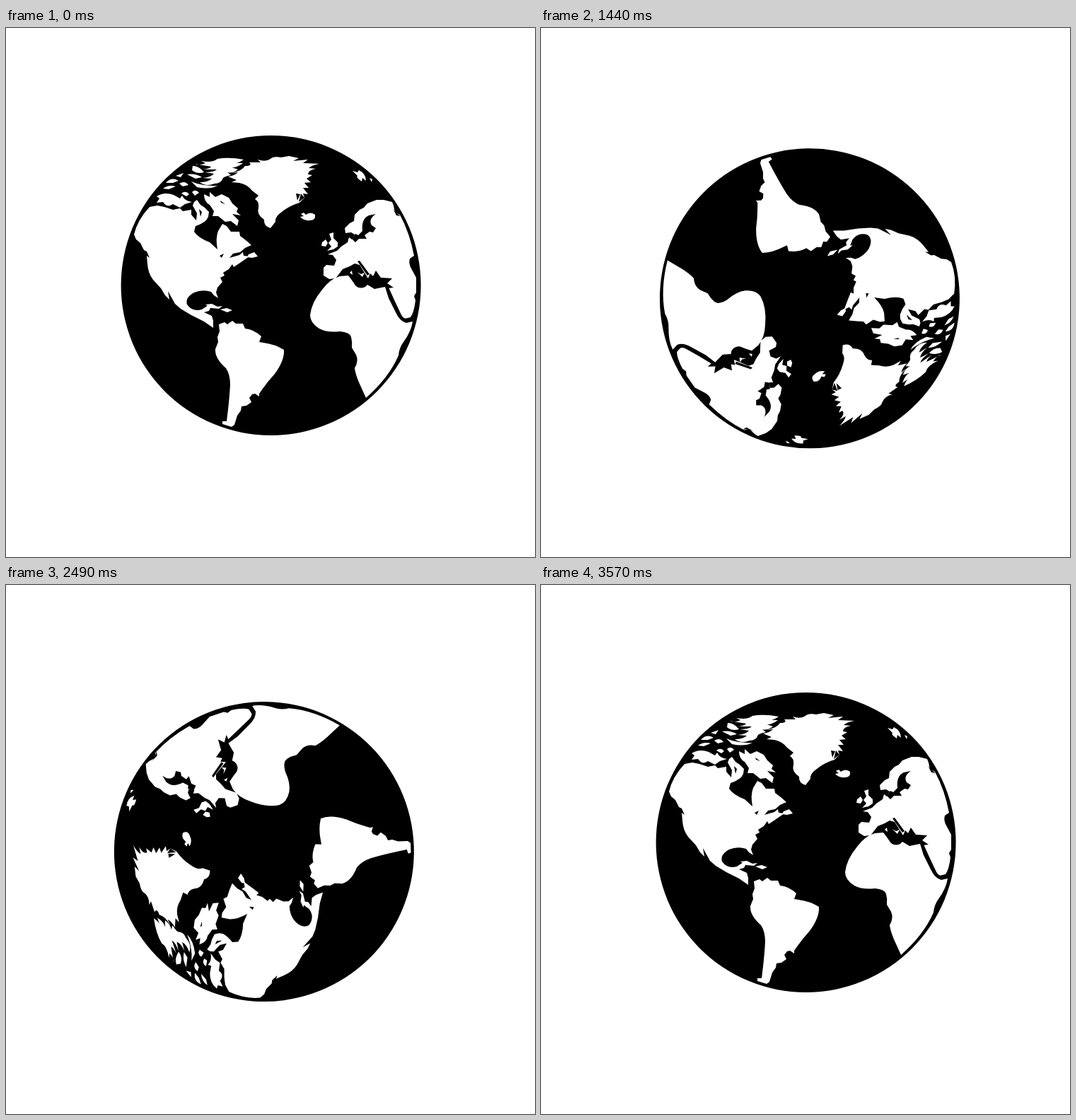
An HTML page with a canvas that plays this animation: 748x748 px, repeating every 3.6 s.

```html
<!DOCTYPE html>
<html lang="en">
<head>
<meta charset="utf-8">
<title>Spinning globe</title>
<style>
  html, body { margin: 0; width: 100%; height: 100%; overflow: hidden; background: #fff; }
  canvas { display: block; }
</style>
</head>
<body>
<canvas id="stage" width="748" height="748"></canvas>
<script>
const ctx = document.getElementById('stage').getContext('2d');

const PIVOT = { x: 374.4, y: 374 };
const GLOBE = { x: 374.6, y: 364, r: 212 };
const STEP_MS = 30;
const STEPS = 120;

const land = {
  northAmerica: `M181 292 Q186 271 203 253 L214 251 L224 253 L236 257 L246 255 L250 259 L262 257
    L262 264 L269 272 L270 262 L264 251 L266 246 L270 243 L275 250 L281 254 L287 260 L286 267 L283 272
    Q277 277 268 280 L266 288 Q272 297 288 303 L299 313 Q296 297 300 287 L306 277 L312 280 L318 288
    L330 288 L331 294 L339 300 L347 307 L338 311 L331 317 L321 319 L316 325 L330 321 L335 317 L336 322
    L344 323 L331 332 L322 338 L320 334 L315 341 L307 346 L309 350 L303 353 L306 359 L299 367 L297 374
    L300 382 L294 378 L290 373 Q278 369 266 374 Q253 381 256 391 Q264 402 277 398 L286 392 L291 392
    L287 400 L280 402 L291 407 L293 414 L293 424 L280 415 L262 406 L247 397 L239 390 L229 372
    L231 384 L225 378 L219 368 L208 356 Q201 347 200 334 L199 322 L203 325 L199 316 L195 314
    L190 304 L184 299 Z`,
  southAmerica: `M301 419 L309 416 L313 419 L320 414 L325 418 L335 418 L338 425 Q350 426 361 436 L358 444
    L364 445 Q380 447 393 455 Q394 470 380 489 Q370 500 363 510 L358 517 L358 521 L352 517 L348 518
    L344 523 L347 529 L340 534 L333 535 L332 541 L327 548 L323 561 L319 564 L306 560 L306 556 L312 556
    Q316 525 317 504 Q317 490 311 481 Q295 467 296 454 L300 444 L299 437 L302 429 Z`,
  greenland: `M314 210 Q323 209 328 204 L319 205 Q334 202 338 195 Q349 195 344 190 L360 190 L356 186
    Q367 190 374 185 Q378 181 389 183 L400 181 L414 184 L406 188 L427 186 L420 191 L443 192
    Q432 194 428 198 L438 199 Q427 201 427 207 L433 208 L425 213 L431 218 L422 219 L428 226
    L420 226 L427 235 L420 234 L422 240 L415 247 Q401 251 390 260 Q380 267 381 274 L374 283
    Q364 280 365 271 Q354 264 357 254 Q358 245 352 242 L357 237 L348 230 Q341 221 330 219
    L319 218 L326 215 Z`,
  baffin: `M280 235 L288 239 L288 232 L296 239 L305 235 L315 240 L320 248 L328 255
    L326 260 L332 265 L320 263 L329 272 L327 280 L318 273 L310 274 L300 266 L292 266 L294 259
    L288 250 Q280 246 280 235 Z`,
  victoria: `M213 247 L217 241 L213 238 Q224 231 237 236 L246 241 L249 237 Q253 245 263 246 L253 249
    L246 254 L236 249 Q228 255 222 246 Z`,
  ellesmere: `M266 192 Q275 195 282 191 L276 188 Q292 191 299 185 Q315 182 336 186 Q328 192 323 191
    L335 191 Q326 198 319 197 L328 200 Q320 206 313 204 L318 208 Q309 210 307 212 Q304 220 295 220
    Q283 225 274 218 Q286 218 291 213 L278 212 Q290 211 294 206 L281 204 Q294 204 298 200
    L278 200 Q288 199 290 196 Z`,
  europe: `M480 290 L479 283 L486 276 L492 273 L493 264 L500 257 L506 254 L511 248 L524 243 L534 243
    L546 246 L548 251 L550 261 L557 264 Q571 290 577 322 L571 326 Q569 333 573 340 L580 353 L580 374
    L577 379 L579 385 Q577 402 572 409 L564 411 L558 407 L551 394 L543 380 L540 368 L548 367 L539 361
    L546 354 L530 353 L523 343 L519 351 L515 347 L512 354 L500 335 L493 333 L486 337
    L476 341 L470 349 L466 354 L457 355 L449 350 L449 339 L453 335 L464 336 L467 328 L462 321 L455 320
    L468 315 L474 309 L483 303 L485 296 L489 299 L493 292 L488 289 Z`,
  africa: `M430 406 Q432 388 447 370 Q458 355 472 351 L484 350 Q491 359 494 364 Q500 370 508 366
    L511 363 L521 369 L536 366 L541 382 L551 402 Q557 415 566 417 L575 415 Q573 429 562 444
    Q556 452 555 463 Q541 495 509 523 L499 501 Q494 489 493 481 Q499 471 495 462 L489 452
    Q490 444 488 437 Q486 430 472 429 Q454 431 443 425 Q430 417 430 406 Z`,
  islands: `M417 263 L421 261 L424 264 Q431 259 437 264 Q438 272 430 272 Q421 273 416 267 L421 266 Z
    M343 320 L351 317 L356 323 L348 325 L341 324 Z
    M457 291 L463 289 L463 297 L469 303 L469 309 L463 313 L454 315 L460 309 L456 304 L460 299 Z
    M447 303 L452 299 L455 304 L452 309 L446 308 Z
    M490 202 L497 204 L499 201 Q509 206 509 216 L504 212 L503 217 Q494 211 497 209 Z
    M514 212 L518 214 L517 218 Z
    M282 391 L291 390 L299 394 L306 393 L301 397 L290 396 Z
    M303 398 L312 396 L320 399 L313 402 Z
    M486 346 L489 343 L490 349 Z
    M497 345 L502 348 L507 346 L504 352 Z`,
  arcticIslets: `M264 195 Q273 195 280 204 Q270 207 263 201 Z
    M256 207 Q268 205 277 211 L268 213 Z
    M240 209 L251 205 L247 211 Z
    M226 219 Q234 210 244 216 L236 219 Z
    M245 220 Q253 215 258 222 L250 224 Z
    M262 217 L270 220 Q284 224 299 223 Q288 229 270 225 Z
    M222 227 Q230 221 240 224 L230 228 Z
    M248 234 Q254 229 259 235 L255 238 Z
    M263 232 Q268 227 273 233 L267 237 Z`
};

const sea = {
  baltic: `M504 287 Q502 270 513 265 L523 263 Q512 270 517 279 L523 283 L519 289 L514 288
    L507 293 L510 298 L499 298 L494 303 L489 298 L494 291 L498 293 Z`,
  adriatic: 'M497 330 L500 329 L514 348 L511 350 Z',
  whiteSea: 'M547 255 L551 261 L558 266 L552 265 Z',
  greatLakes: 'M302 322 L308 319 L305 325 Z',
  fjords: `M410 234 L416 235 L412 244 Z M414 246 L417 234 L422 240 Z
    M273 256 L277 260 L275 267 Z M303 244 L310 249 L304 247 Z`
};

const toPaths = shapes => Object.values(shapes).map(d => new Path2D(d));
const landPaths = toPaths(land);
const seaPaths = toPaths(sea);
const redSea = new Path2D('M538 365 L548 387 L557 406 Q561 414 568 413 L575 411');

function fillAll(paths, color) {
  ctx.fillStyle = color;
  paths.forEach(path => ctx.fill(path));
}

function draw(ms) {
  const step = Math.floor(ms / STEP_MS) % STEPS;
  // The first and last steps share the same pose.
  const angle = 2 * Math.PI * step / (STEPS - 1);

  ctx.setTransform(1, 0, 0, 1, 0, 0);
  ctx.fillStyle = '#fff';
  ctx.fillRect(0, 0, 748, 748);

  ctx.translate(PIVOT.x, PIVOT.y);
  ctx.rotate(angle);
  ctx.translate(-PIVOT.x, -PIVOT.y);

  ctx.fillStyle = '#000';
  ctx.beginPath();
  ctx.arc(GLOBE.x, GLOBE.y, GLOBE.r, 0, 2 * Math.PI);
  ctx.fill();

  fillAll(landPaths, '#fff');
  fillAll(seaPaths, '#000');
  ctx.lineWidth = 4;
  ctx.stroke(redSea);
}

const start = performance.now();
function tick() {
  draw(performance.now() - start);
  requestAnimationFrame(tick);
}
tick();
</script>
</body>
</html>
```
